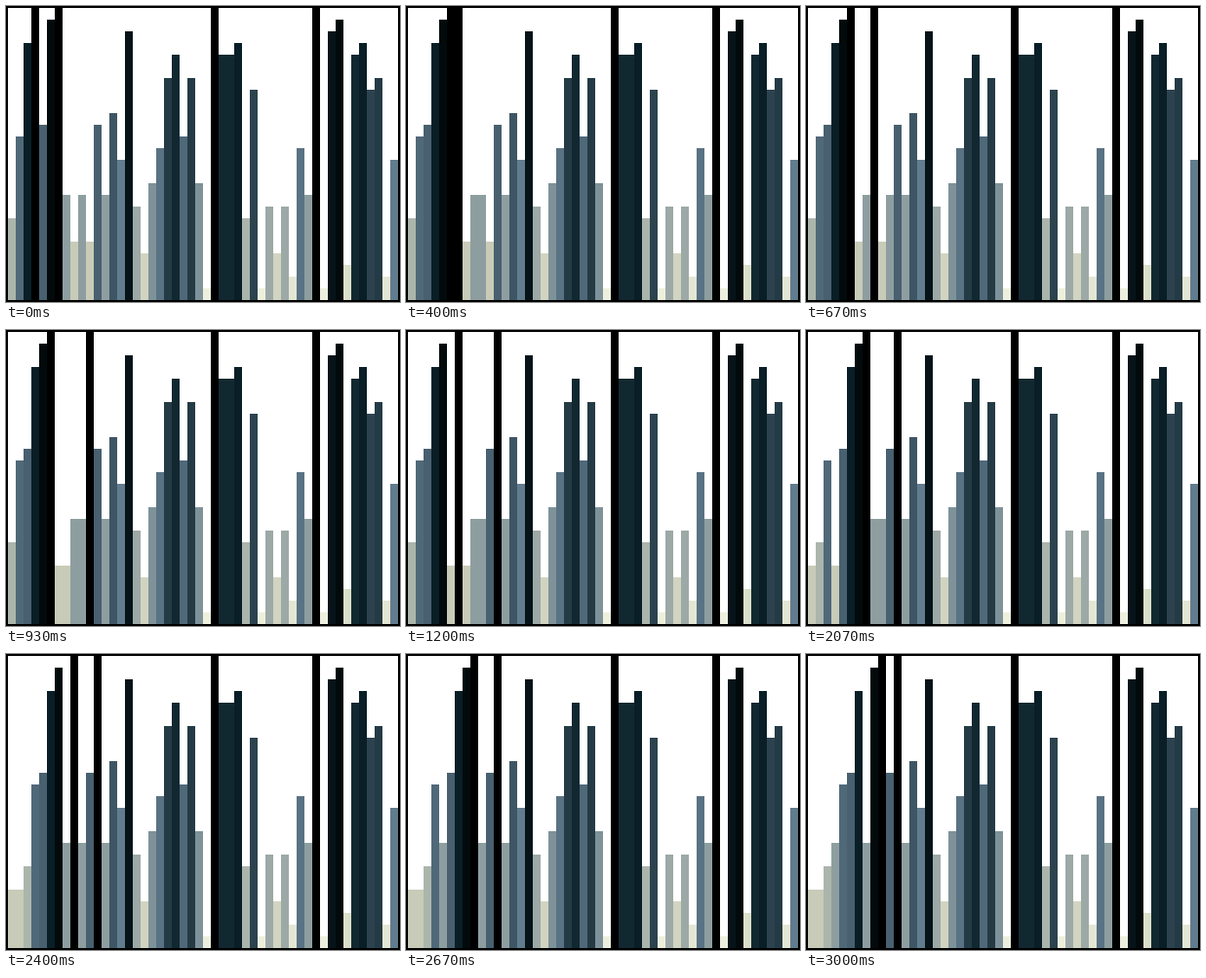
Animation, 404 px wide and 304 px high, one loop 3.07 s. Source, as an HTML page with a canvas:

```html
<!DOCTYPE html>
<html lang="en">
<head>
<meta charset="utf-8">
<title>In-place merge sort</title>
<style>
html, body { margin: 0; width: 100%; height: 100%; overflow: hidden; background: #000; }
canvas { display: block; }
</style>
</head>
<body>
<canvas id="stage" width="404" height="304"></canvas>
<script>
const ctx = document.getElementById('stage').getContext('2d');
const LOOP = 3070, BORDER = 2, BAR = 8, UNIT = 12, WIDTH = 400, HEIGHT = 300;

// The unsorted values, one per bar
const START = [
  7, 14, 22, 25, 15, 24, 25, 9, 5, 9, 5, 15, 9, 16, 12, 23, 8, 4, 10, 13, 19, 21, 14, 19, 10,
  1, 25, 21, 21, 22, 7, 18, 1, 8, 4, 8, 2, 13, 9, 25, 1, 23, 24, 3, 21, 22, 18, 19, 2, 12
];

// Bars darken with height, from cream through slate to black.
const ramp = document.createElement('canvas').getContext('2d', { willReadFrequently: true });
const shade = ramp.createLinearGradient(1.5, 0, 25.5, 0);
const stop = (value, colour) => shade.addColorStop((value - 1) / 24, colour);
stop(1, '#eef0de');
stop(5, '#c8cbb8');
stop(12, '#627c8e');
stop(22, '#091e26');
stop(25, '#000');
ramp.fillStyle = shade;
ramp.fillRect(0, 0, 26, 1);

function colour(value) {
  const [r, g, b] = ramp.getImageData(value, 0, 1, 1).data;
  return `rgb(${r},${g},${b})`;
}
const colours = Array.from({ length: 26 }, (_, value) => colour(value));

function swap(list, j) {
  [list[j - 1], list[j]] = [list[j], list[j - 1]];
}

// Sorts both halves, then walks each right-hand item back into place.
function* mergeSort(list, lo, hi) {
  if (hi - lo < 2) return;
  const mid = (lo + hi) >> 1;
  yield* mergeSort(list, lo, mid);
  yield* mergeSort(list, mid, hi);
  for (let i = mid; i < hi; i++) {
    for (let j = i; j > lo && list[j - 1] > list[j]; j--) {
      swap(list, j);
      yield j;
    }
  }
}

const swaps = [...mergeSort(START.slice(), 0, START.length)];

// Fifteen ticks a second; eight swaps in every twelve ticks, slightly uneven.
const BEATS = [1, 2, 4, 6, 7, 9, 10];

function swapsDone(ms) {
  const tick = Math.floor((Math.floor(ms / 10) + 0.5) * 0.15);
  return 8 * Math.floor(tick / 12) + BEATS.filter(beat => beat <= tick % 12).length;
}

function draw(ms) {
  const list = START.slice();
  swaps.slice(0, swapsDone(ms)).forEach(j => swap(list, j));
  ctx.fillStyle = '#000';
  ctx.fillRect(0, 0, WIDTH + 2 * BORDER, HEIGHT + 2 * BORDER);
  ctx.fillStyle = '#fff';
  ctx.fillRect(BORDER, BORDER, WIDTH, HEIGHT);
  list.forEach((value, i) => {
    const tall = value * UNIT;
    ctx.fillStyle = colours[value];
    ctx.fillRect(BORDER + i * BAR, BORDER + HEIGHT - tall, BAR, tall);
  });
}

const begin = performance.now();
function loop() {
  draw((performance.now() - begin) % LOOP);
  requestAnimationFrame(loop);
}
loop();
</script>
</body>
</html>
```
